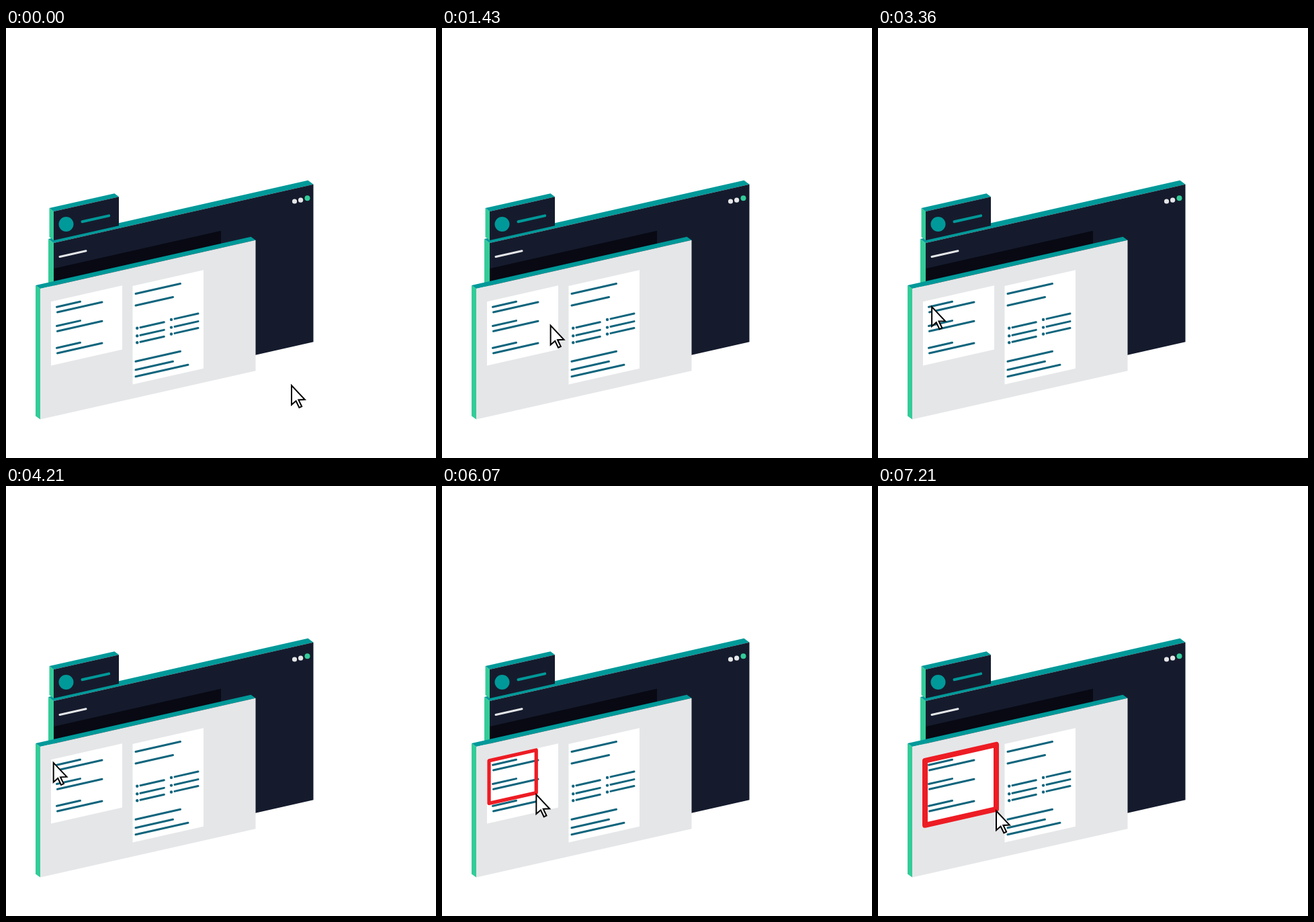
An HTML page with a canvas that plays this animation: 640 px wide and 640 px high, repeating every 8000 ms.

```html
<!DOCTYPE html>
<html lang="en">
<head>
<meta charset="utf-8">
<title>Select a card</title>
<style>
  html, body { margin: 0; width: 100%; height: 100%; overflow: hidden; background: #fff; }
  canvas { display: block; width: 640px; height: 640px; }
</style>
</head>
<body>
<canvas id="stage"></canvas>
<script>
const SIZE = 640, LOOP = 8000, FPS = 14;
const TILT = 0.2255;
const TEAL = '#009999', GREEN = '#33cc99', NAVY = '#151b2d', BLACK = '#080913';
const GREY = '#e5e6e8', INK = '#10657d', RED = '#ed1c24';

const canvas = document.getElementById('stage');
const ratio = window.devicePixelRatio || 1;
canvas.width = canvas.height = SIZE * ratio;
const ctx = canvas.getContext('2d');

function trace(points) {
  ctx.beginPath();
  points.forEach(([x, y]) => ctx.lineTo(x, y));
  ctx.closePath();
}

function fill(color, points) {
  trace(points);
  ctx.fillStyle = color;
  ctx.fill();
}

// Upright rectangle seen at an angle: its right side is raised.
function face(x, y, w, h) {
  const rise = w * TILT;
  return [[x, y], [x + w, y - rise], [x + w, y + h - rise], [x, y + h]];
}

function slab(x, y, w, h, dx, dy, color) {
  const [a, b, c, d] = face(x, y, w, h);
  const back = ([px, py]) => [px - dx, py - dy];
  fill(GREEN, [a, d, back(d), back(a)]);
  fill(TEAL, [a, b, back(b), back(a)]);
  fill(color, [a, b, c, d]);
}

function bar(x, y, length, color = INK, width = 3) {
  ctx.beginPath();
  ctx.moveTo(x, y);
  ctx.lineTo(x + length, y - length * TILT);
  ctx.lineWidth = width;
  ctx.lineCap = 'round';
  ctx.strokeStyle = color;
  ctx.stroke();
}

function dot(x, y, r, color) {
  ctx.beginPath();
  ctx.arc(x, y, r, 0, Math.PI * 2);
  ctx.fillStyle = color;
  ctx.fill();
}

function drawWindows() {
  slab(71, 320, 386.5, 234.5, 8, 6, NAVY);
  fill(BLACK, face(71, 358, 249, 100));
  bar(80, 340.5, 39, GREY);
  dot(429.5, 258, 3.6, GREY);
  dot(438.6, 256.2, 3.6, GREY);
  dot(448.5, 253.3, 4, GREEN);

  slab(71, 273, 97, 43, 6.5, 5, NAVY);
  dot(89.5, 292, 11, TEAL);
  bar(113.5, 288.3, 39.7, TEAL, 4);

  slab(51, 388, 320.5, 194.5, 7, 5, GREY);
  fill('#fff', face(67, 407.2, 106, 95.3));
  fill('#fff', face(188.5, 384, 105.5, 146.5));

  for (const y of [415.2, 443.5, 476.2]) {
    bar(75.5, y, 35);
    bar(76.5, y + 7.8, 66.5);
  }
  bar(193, 395.5, 66.5);
  bar(193, 413, 55.5);
  for (const y of [445.7, 457.3, 467.2]) {
    dot(195.2, y + 1, 2.2, INK);
    bar(200, y, 35.3);
    dot(246, y - 11.7, 2.2, INK);
    bar(251, y - 12.8, 35);
  }
  bar(193, 496.3, 66.5);
  bar(193, 508.8, 55.5);
  bar(193, 518.8, 78);
}

// Approach: time (ms), x, and speed (px/ms).
const START = 4290, END = 7210;
const KEYS = [
  [0, 425, -0.33], [860, 228.5, -0.152], [1430, 161.5, -0.087], [1710, 140.5, -0.066],
  [2570, 98.5, -0.033], [3430, 79, -0.015], [START, 70.3, -0.004]
];

function approachX(t) {
  const i = KEYS.findIndex(k => t < k[0]);
  const [t0, x0, v0] = KEYS[i - 1], [t1, x1, v1] = KEYS[i];
  const d = t1 - t0, u = (t - t0) / d, w = 1 - u;
  return x0 * w * w * (1 + 2 * u) + x1 * u * u * (3 - 2 * u) + d * u * w * (v0 * w - v1 * u);
}

function drawSelection(scale) {
  ctx.save();
  ctx.translate(70, 408.8);
  ctx.scale(scale, scale);
  trace(face(0, 0, 106, 96));
  ctx.lineWidth = 8;
  ctx.lineJoin = 'round';
  ctx.strokeStyle = RED;
  ctx.stroke();
  ctx.restore();
}

function drawCursor(x, y) {
  ctx.save();
  ctx.translate(x, y + 1);
  trace([[0, 0], [0, 28.8], [6.6, 23], [11.4, 33], [15.2, 31.2], [10.4, 21.4], [19.8, 21]]);
  ctx.fillStyle = '#fff';
  ctx.fill();
  ctx.lineWidth = 2;
  ctx.lineJoin = 'miter';
  ctx.strokeStyle = '#000';
  ctx.stroke();
  ctx.restore();
}

function draw(t) {
  ctx.setTransform(ratio, 0, 0, ratio, 0, 0);
  ctx.fillStyle = '#fff';
  ctx.fillRect(0, 0, SIZE, SIZE);
  drawWindows();
  if (t < START) {
    const x = approachX(t);
    drawCursor(x, 410.7 + (x - 70) * 0.339);
  } else {
    const u = Math.min(1, (t - START) / (END - START));
    const drag = u * u * (3 - 2 * u);
    if (drag > 0) drawSelection(drag);
    drawCursor(70.3 + 105.7 * drag, 410.8 + 71.7 * drag);
  }
}

let begin = null;
function tick(now) {
  if (begin === null) begin = now;
  const t = (now - begin) % LOOP;
  draw(Math.floor((t + 6) * FPS / 1000) * 1000 / FPS);
  requestAnimationFrame(tick);
}
draw(0);
requestAnimationFrame(tick);
</script>
</body>
</html>
```
